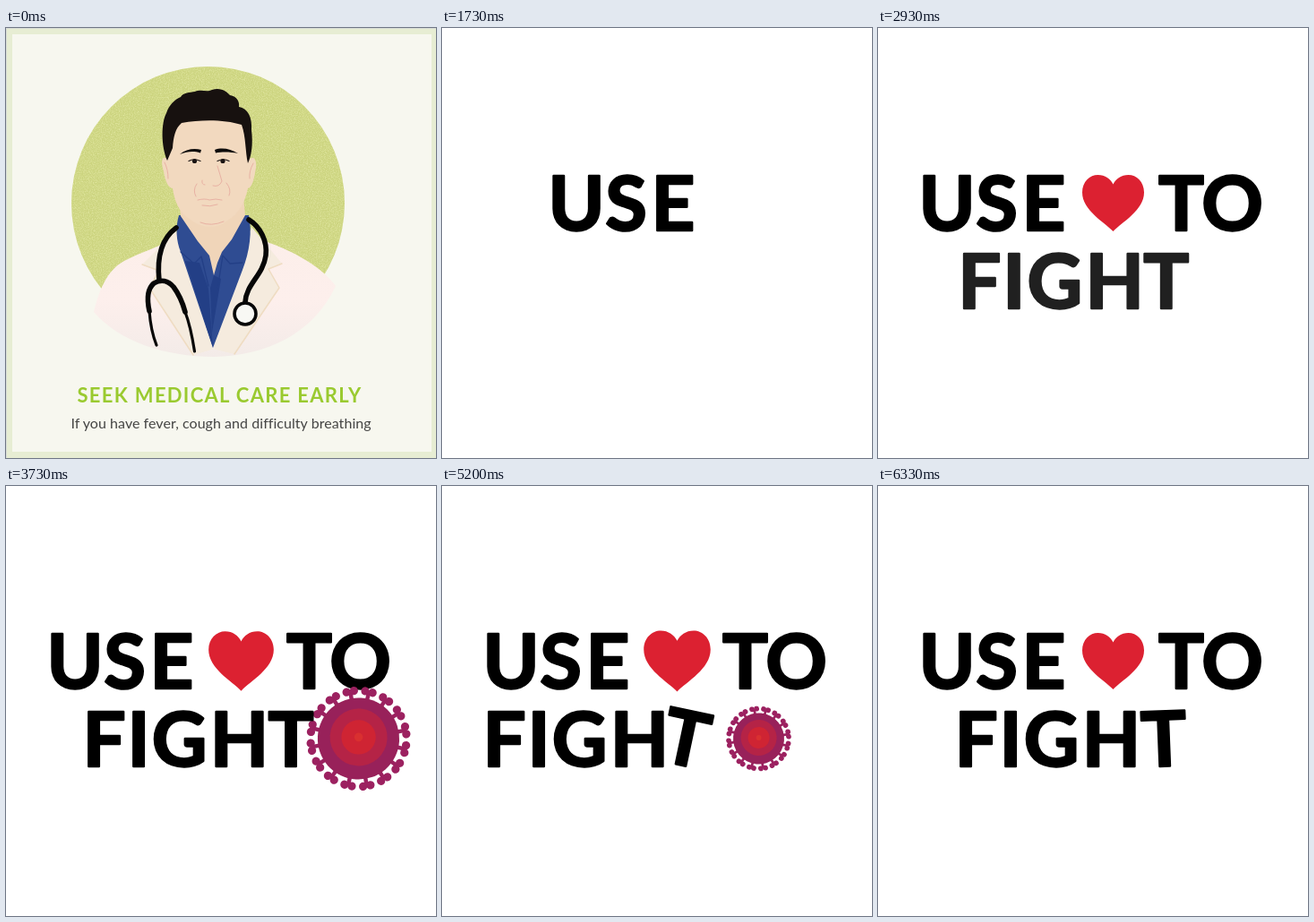
An HTML page that plays this animation: 480x480 px, repeating every 6.39 s.

```html
<!DOCTYPE html>
<html lang="en">
<head>
<meta charset="utf-8">
<title>Seek medical care early</title>
<style>
  html, body { margin: 0; width: 100%; height: 100%; overflow: hidden; background: #fff; }
  svg { display: block; width: 100vw; height: 100vh; }
  text { font-family: Lato, "Open Sans", sans-serif; text-anchor: middle; }
  .big text { font-size: 85px; font-weight: 700; stroke: #000; stroke-width: 2.5; stroke-linejoin: round; }
  .title { font-size: 22px; font-weight: 700; letter-spacing: 1.3px; fill: #9aca30; }
  .sub { font-size: 16px; letter-spacing: .05px; fill: #444; }
  .line { fill: none; stroke-linecap: round; stroke-linejoin: round; }
  .tube { stroke: #070707; stroke-width: 5.6; }
  .thin { stroke: #070707; stroke-width: 3.2; }
  .crease { stroke: #e8b1a3; stroke-width: 1; }
</style>
</head>
<body>
<svg viewBox="0 0 480 480">
  <defs>
    <filter id="grain" x="0" y="0" width="1" height="1" color-interpolation-filters="sRGB">
      <feTurbulence type="fractalNoise" baseFrequency=".8" numOctaves="2" seed="4"/>
      <feColorMatrix values="0 0 0 0 .9  0 0 0 0 .92  0 0 0 0 .66  1.6 0 0 0 -.6"/>
      <feComposite in2="SourceGraphic" operator="in" result="specks"/>
      <feMerge><feMergeNode in="SourceGraphic"/><feMergeNode in="specks"/></feMerge>
    </filter>
    <linearGradient id="cloth" x1="0" y1="0" x2="0" y2="1">
      <stop offset="0" stop-color="#fceee9"/>
      <stop offset=".55" stop-color="#fdefec"/>
      <stop offset="1" stop-color="#f3ebe8"/>
    </linearGradient>
  </defs>

  <g id="doctor">
    <rect width="480" height="480" fill="#e7edd3"/>
    <path d="M0 .5H480M.5 0V480" stroke="#d9dcd6"/>
    <rect x="7" y="7" width="468" height="466" fill="#f7f7ef"/>
    <circle cx="225.5" cy="195.5" r="152.5" fill="#ccd47f" filter="url(#grain)"/>

    <path fill="url(#cloth)" d="M192 230C176 244 150 250 132 260C112 271 104 293 98 317C126 350 178 367 232 367C292 366 344 340 368 288C354 268 325 252 300 242C290 239 283 235 275 226Z"/>
    <path fill="#f5ebde" d="M190 226L152 264L171 271L160 290L209 365L233 358L194 242ZM274 222L308 263L293 269L305 290L255 364L230 358L268 250Z"/>
    <path class="line" stroke="#efdcc2" stroke-width="1.5" d="M152 264L171 271L160 290L209 365M308 263L293 269L305 290L255 364"/>
    <path fill="#2f4c92" d="M193 209C189 222 190 238 195 250L231 357L264 270C272 250 275 226 271 209Z"/>
    <path fill="#233f86" d="M200 260L216 262L226 291L231 357ZM232 276L228 290L230 340L240 280Z"/>
    <path fill="#f0d5b9" d="M192 178L195 210L214 238L227 254L232 276L236 262L241 250L252 236L267 209L264 178Z"/>
    <path class="line" stroke="#233f86" stroke-width="1.3" d="M195 250L210 263L218 255L226 288M264 262L250 263L242 254L236 292"/>

    <g id="head">
      <path fill="#f2d9bf" d="M184 100C181 118 180 130 180 145C173 143 173 150 176 160C178 172 181 178 186 179C188 194 194 207 206 214C219 224 236 224 247 215C261 207 267 193 270 179C275 178 277 168 279 156C280 147 277 143 272 146L270 104C250 88 205 88 184 100Z"/>
      <path fill="#17110f" d="M180 148C173 132 173 106 179 95C182 86 188 80 195 77C198 72 205 72 211 71C218 68 224 72 230 69C240 66 246 71 250 75C258 76 261 83 260 88C270 90 275 99 274 114C276 130 274 143 270 151C267 138 268 122 263 108C244 102 218 102 196 106C189 112 187 121 186 134Z"/>
      <path fill="#0d0b0b" d="M194 141C201 135 210 134 218 136L217 139.500C209 137 202 138 194 141ZM233 136C241 133 251 135 259 140C250 138 241 138 234 139.500Z"/>
      <path class="line" stroke="#1a1413" stroke-width="1.2" d="M204 148.500Q210 145 217 148.500M236 148.500Q243 145 249 148.500"/>
      <circle cx="210.500" cy="148.500" r="2.600" fill="#1a1413"/>
      <circle cx="242" cy="148.500" r="2.600" fill="#1a1413"/>
      <path class="line crease" d="M236 154Q239 164 241 171Q238 178 231 176M222 175Q218 175 219 170M213 174Q208 181 212 188M246 173Q252 180 249 187M214 192Q222 190 227 192Q234 190 241 192M219 198Q228 200 236 197M217 217Q229 222 243 216M177 150Q181 158 181 168M276 151Q271 160 272 168"/>
    </g>

    <g id="scope" class="line">
      <path class="tube" d="M271 214C284 222 292 238 290 254C287 276 268 286 267 306"/>
      <path class="tube" d="M190 223C175 234 168 254 171 282"/>
      <path class="tube" d="M160 316C157 302 158 291 165 285C173 280 181 282 187 289C193 297 197 306 200 317"/>
      <path class="thin" d="M160 316C161 330 164 344 168 354M200 317C205 330 208 345 210.500 361"/>
      <circle cx="267" cy="319" r="12" fill="#f8f8f4" stroke="#070707" stroke-width="3.600"/>
    </g>

    <text class="title" x="238.500" y="417.500">SEEK MEDICAL CARE EARLY</text>
    <text class="sub" x="240" y="447">If you have fever, cough and difficulty breathing</text>
  </g>

  <g id="slogan" class="big">
    <rect width="480" height="480" fill="#fff"/>
    <text id="use" x="77 132.5 185" y="225.8">USE</text>
    <path id="heart" fill="#dc2131" d="M0 31.500C-10 21 -34.500 8 -34.500 -12C-34.500 -24 -26 -31.500 -17 -31.500C-9 -31.500 -3 -27 0 -21C3 -27 9 -31.500 17 -31.500C26 -31.500 34.500 -24 34.500 -12C34.500 8 10 21 0 31.500Z"/>
    <text id="to" x="338.500 395.500" y="225.800">TO</text>
    <g id="virus">
      <g id="spikes" fill="#9c2160"></g>
      <circle r="28.500" fill="#98215a"/>
      <circle r="20" cy="-1" fill="#b52346"/>
      <circle r="12" cy="-1" fill="#cf2433"/>
      <circle r="3" cy="-1" fill="#d93030"/>
    </g>
    <g id="fight">
      <text x="69.5 108 153.5 220.5" y="312.800">FIGH</text>
      <text id="leg" y="55.800">T</text>
    </g>
  </g>
</svg>
<script>
const LOOP = 6390, CUT = 15, KICK = 54;
const $ = id => document.getElementById(id);

// Progress from 0 to 1 between two steps, and easings on it.
const ramp = (s, from, to) => Math.min(1, Math.max(0, (s - from) / (to - from)));
const out = u => 1 - (1 - u) ** 3;
const smooth = u => u * u * (3 - 2 * u);
const pulse = d => Math.max(0, 1 - Math.abs(d) / 3);

const place = (id, x, y, rest = '') => $(id).setAttribute('transform', `translate(${x} ${y}) ${rest}`);
const fade = (id, amount) => $(id).setAttribute('opacity', amount);

function drawDoctor(s) {
  const sway = (1 - Math.cos(3 * Math.PI * ramp(s, 1, 11))) / 2;
  place('head', -.8 * sway, -1.5 * sway);
  place('scope', 0, 215, `skewX(${-2.8 * sway}) scale(1 ${1 - .03 * sway}) translate(0 -215)`);
}

function drawTopLine(s) {
  const shift = 73 * (1 - out(ramp(s, 21, 25)));
  place('use', shift, 0);
  place('to', shift, 0);
  fade('use', ramp(s, 14, 17));
  fade('to', ramp(s, 21, 24));

  const beat = pulse(s - 21) + (s > 34 ? pulse(s % 7 - 3) : 0);
  place('heart', 262.5 + shift * 1.02, 195.5, `scale(${ramp(s, 17, 21) + .08 * beat})`);
}

function drawFight(s) {
  const makeRoom = 40 * (1 - smooth(ramp(s, 37, 42)));
  const shift = makeRoom + 30 * (1 - out(ramp(s, 28, 30))) + 40 * smooth(ramp(s, 55, 63));
  place('fight', shift, 0);
  fade('fight', ramp(s, 27, 29.3));

  // The T leans back, kicks, then swings to rest.
  const d = s - KICK;
  const angle = d <= 0
    ? 15 * smooth(ramp(s, 47, KICK))
    : -45 * Math.exp(-d / 3) * Math.cos(2 * Math.PI * d / 9);
  place('leg', 278, 257, `rotate(${angle})`);

  const fly = ramp(s, KICK, 63);
  const size = 1.6 * out(ramp(s, 31, 37)) - .6 * smooth(ramp(s, 38, 42));
  const spin = 5 * Math.sin((s - 42) * Math.PI / 4) + 185 * fly;
  place('virus', 353.5 + makeRoom + 210 * fly ** 1.5, 282 - 100 * fly ** 2,
    `scale(${size}) rotate(${spin})`);
}

const SPIKES = 16;
for (let i = 0; i < SPIKES; i++)
  $('spikes').innerHTML += `<g transform="rotate(${(i + .4) * 360 / SPIKES})">
    <rect x="-1.4" y="-33" width="2.8" height="8"/>
    <circle cx="-2.6" cy="-33.4" r="2.9"/><circle cx="2.6" cy="-33.4" r="2.9"/></g>`;

// Steps alternate 130 ms and 70 ms.
function draw(now) {
  const t = now % LOOP;
  const s = 2 * Math.floor(t / 200) + (t % 200 >= 130 ? 1 : 0);
  $('doctor').style.display = s < CUT ? '' : 'none';
  $('slogan').style.display = s < CUT ? 'none' : '';
  drawDoctor(s);
  drawTopLine(s);
  drawFight(s);
}
const start = performance.now();
function tick() {
  draw(performance.now() - start);
  requestAnimationFrame(tick);
}
tick();
</script>
</body>
</html>
```
